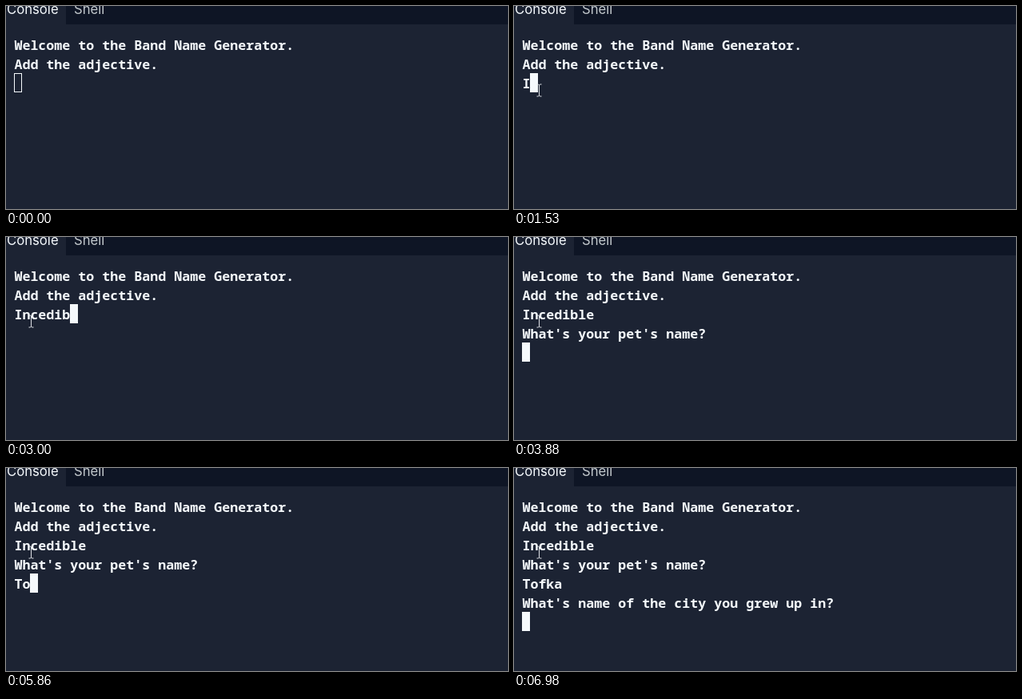
Animation of 628 by 254 pixels, one loop 8 s. Source, as an HTML page:

```html
<!DOCTYPE html>
<html lang="en">
<head>
<meta charset="utf-8">
<title>Console</title>
<style>
  html, body { margin: 0; width: 100%; height: 100%; overflow: hidden; background: #1c2333; }
  svg { display: block; width: 628px; height: 254px; }
  .tab { font: 16.7px Inter, "Open Sans", sans-serif; }
  .line { font: 600 16.667px "Noto Sans Mono", "Liberation Mono", monospace; fill: #f5f9fc; }
</style>
</head>
<body>
<svg viewBox="0 0 628 254">
  <rect width="628" height="254" fill="#1c2333"/>
  <rect x="75" width="553" height="23" fill="#0e1525"/>
  <text class="tab" x="1" y="10" fill="#f5f9fc">Console</text>
  <text class="tab" x="85" y="10" fill="#c2c8cc">Shell</text>
  <g id="lines"></g>
  <rect id="caret" stroke="#f5f9fc" width="9" height="23"/>
  <circle id="click" cx="29" cy="104" r="15" fill="#fff000" fill-opacity=".5"/>
  <path id="mouse" d="M-3 -7.5H-1L0 -6.5L1 -7.5H3M0 -6.5V6.5M-3 7.5H-1L0 6.5L1 7.5H3"
        fill="none" stroke="#dfe2e6" stroke-width="1"/>
</svg>
<script>
const LOOP = 8000, CELL = 10, ROW = 24, LEFT = 10, TOP = 36;
const $ = id => document.getElementById(id);

// Each answer lists the time of every key; the prompt after it appears on Enter.
const intro = ["Welcome to the Band Name Generator.", "Add the adjective."];
const answers = [
  { text: "Incedible", keys: [1530, 1730, 2130, 2330, 2530, 2730, 3000, 3400, 3530],
    enter: 3880, next: "What's your pet's name?" },
  { text: "Tofka", keys: [5070, 5860, 6190, 6390, 6850],
    enter: 6980, next: "What's name of the city you grew up in?" }
];

// Pointer stops: time, x, y
const path = [
  [70, 452.5, 242.5], [140, 280.5, 188.5], [200, 128.5, 137.5],
  [270, 52.5, 111.5], [340, 31.5, 105.5]
];

const rows = Array.from({ length: 7 }, (_, i) => {
  const el = document.createElementNS("http://www.w3.org/2000/svg", "text");
  el.setAttribute("class", "line");
  el.setAttribute("x", LEFT + 0.4);
  el.setAttribute("y", TOP + i * ROW + 19);
  $("lines").append(el);
  return el;
});

function consoleAt(t) {
  const out = [...intro];
  for (const a of answers) {
    out.push(a.text.slice(0, a.keys.filter(k => t >= k).length));
    if (t < a.enter) return out;
    out.push(a.next);
  }
  return [...out, ""];
}

function show(el, on) {
  el.setAttribute("visibility", on ? "visible" : "hidden");
}

function draw(t) {
  const text = consoleAt(t);
  rows.forEach((el, i) => {
    const s = text[i] || "";
    if (el.textContent !== s) el.textContent = s;
  });

  const last = text.length - 1;
  const caret = $("caret");
  caret.setAttribute("x", LEFT + text[last].length * CELL + 0.5);
  caret.setAttribute("y", TOP + last * ROW + 0.5);
  caret.setAttribute("fill", t >= 740 ? "#f5f9fc" : "none");

  show($("click"), t >= 670 && t < 940);

  const stop = path.filter(p => t >= p[0]).pop();
  show($("mouse"), !!stop);
  if (stop) $("mouse").setAttribute("transform", `translate(${stop[1]} ${stop[2]})`);
}

const start = performance.now();
function tick() {
  draw((performance.now() - start) % LOOP);
  requestAnimationFrame(tick);
}
tick();
</script>
</body>
</html>
```
